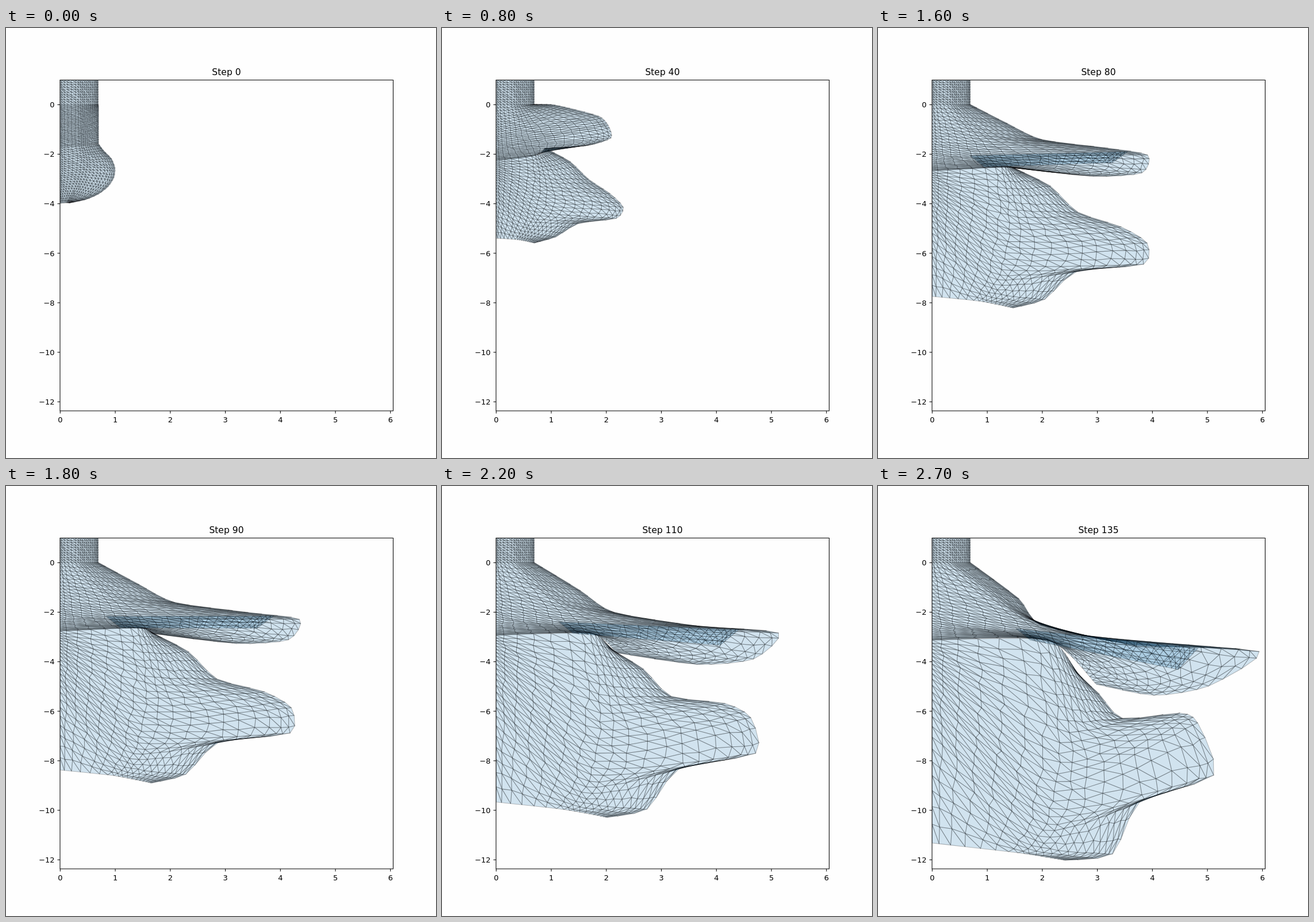
Write an HTML page with a canvas that moves like this. It is 748 px wide and 748 px high and loops after 2.8 s.

```html
<!DOCTYPE html>
<html lang="en">
<head>
<meta charset="utf-8">
<title>Mesh deformation</title>
<style>
  html, body { margin: 0; width: 100%; height: 100%; overflow: hidden; background: #fefefe; }
  canvas, svg { position: absolute; left: 0; top: 0; width: 748px; height: 748px; }
  text { font-family: "DejaVu Sans", sans-serif; font-size: 12.99px; }
  #title { font-size: 15.58px; }
  path { fill: none; stroke: #000; stroke-width: 1.04; }
</style>
</head>
<body>
<canvas id="mesh" width="748" height="748"></canvas>
<svg viewBox="0 0 748 748">
  <g id="axes"><path d="M94 90.5H673.5V666H94Z"/></g>
  <text id="title" x="383.5" y="82" text-anchor="middle">Step 0</text>
</svg>
<script>
const LEFT = 94, TOP = 90, LIP = 133, WALL = 160.5;
const INNER = 7, OUTER = 11, COLS = INNER + OUTER;
const FRAME_MS = 100, FRAMES = 28, STEPS = 5, LAST = (FRAMES - 1) * STEPS;
const ctx = document.getElementById('mesh').getContext('2d');
const title = document.getElementById('title');

// Slow start, then steady growth; 0..1 over the loop.
const travel = s => s * s / (s + 40);
const progress = s => travel(s) / travel(LAST);
const HALF = progress(80);

// Free surface of the jet and of the lower lobe, halfway and at the end.
const jetHalf = [[225,166], [285,194], [400,209], [469,221], [459,252], [375,258], [235,243]];
const jetEnd = [[245,196], [285,242], [450,277], [663,288], [575,348], [480,364], [380,345]];
const lobeHalf = [[238,244], [300,275], [347,320], [423,346], [468,374], [462,411], [345,424], [290,472], [235,487]];
const lobeEnd = [[345,325], [385,362], [425,404], [525,395], [556,412], [584,503], [455,550], [408,640], [325,651]];

const clamp = (x, lo, hi) => Math.max(lo, Math.min(hi, x));
const mix = (a, b, t) => a + (b - a) * t;
const mixPt = (a, b, t) => [mix(a[0], b[0], t), mix(a[1], b[1], t)];
const easeOut = (v, power) => 1 - Math.pow(1 - v, power);

// Parabolic motion through three positions.
function through(a, m, b, g) {
  const wa = (g - HALF) * (g - 1) / HALF;
  const wm = g * (g - 1) / (HALF * (HALF - 1));
  const wb = g * (g - HALF) / (1 - HALF);
  return [0, 1].map(c => wa * a[c] + wm * m[c] + wb * b[c]);
}

// Undeformed surface: straight neck, then an elliptic bulb.
const neck = v => [161, LIP + 68 * Math.pow(v, 1.5)];
function bulb(v) {
  const angle = mix(-55, 80, v) * Math.PI / 180;
  const x = LEFT + 96 * Math.cos(angle);
  return [angle < 0 ? Math.max(161, x) : x, 248 + 57 * Math.sin(angle)];
}

function jetRim(g) {
  const billow = 520 * Math.max(0, g * (HALF - g));
  const pts = jetHalf.map((m, i) => {
    const v = (i + 1) / jetHalf.length;
    const [x, y] = through(neck(v), m, jetEnd[i], g);
    return [x, Math.max(LIP, y - billow * (1 - v))];
  });
  return [[WALL, LIP], ...pts];
}

const lobeRim = g => lobeHalf.map((m, i) =>
  through(bulb(i / (lobeHalf.length - 1)), m, lobeEnd[i], g));

function hermite(a, b, ma, mb, t) {
  const t2 = t * t, t3 = t2 * t;
  return a * (2 * t3 - 3 * t2 + 1) + ma * (t3 - 2 * t2 + t) + b * (3 * t2 - 2 * t3) + mb * (t3 - t2);
}

// Cardinal spline through pts, v in 0..1.
function curve(pts) {
  const n = pts.length - 1, at = i => pts[clamp(i, 0, n)];
  return v => {
    const s = clamp(v, 0, 1) * n, i = Math.min(n - 1, Math.floor(s));
    const a = at(i), b = at(i + 1), p = at(i - 1), q = at(i + 2);
    return [0, 1].map(c => hermite(a[c], b[c], .35 * (b[c] - p[c]), .35 * (q[c] - a[c]), s - i));
  };
}

function noise(i, j) {
  const s = Math.sin(i * 12.9898 + j * 78.233) * 43758.5453;
  return s - Math.floor(s) - .5;
}

function triangle(a, b, c) {
  ctx.beginPath();
  ctx.moveTo(a[0], a[1]);
  ctx.lineTo(b[0], b[1]);
  ctx.lineTo(c[0], c[1]);
  ctx.closePath();
  ctx.fill();
  ctx.stroke();
}

// Triangulated sheet spanned by three guide curves.
function sheet(left, mid, right, rows) {
  const grid = [];
  for (let i = 0; i <= rows; i++) {
    const line = [];
    for (let j = 0; j <= COLS; j++) {
      const jitter = i > 0 && i < rows && j > 0 && j < COLS ? .25 : 0;
      const v = (i + jitter * noise(i, j)) / rows;
      const s = j + jitter * noise(j + 31, i);
      const u = s < INNER ? s / INNER / 2 : .5 + Math.pow((s - INNER) / OUTER, .85) / 2;
      line.push(curve([left(v), mid(v), right(v)])(u));
    }
    grid.push(line);
  }
  for (let i = 0; i < rows; i++) {
    for (let j = 0; j < COLS; j++) {
      const a = grid[i][j], b = grid[i][j + 1], c = grid[i + 1][j], d = grid[i + 1][j + 1];
      triangle(a, b, d);
      triangle(a, d, c);
    }
  }
}

function draw(step) {
  const g = progress(step), spread = step / (step + 20);
  const seam = 209 + 59 * Math.pow(g, .6), foot = 305 + 316 * g;
  const pinch = [131 + 164 * g, 205 + 63 * Math.pow(g, .8)];
  const toe = [105 + 138 * g, 304 + 334 * g];
  const jet = jetRim(g), lobe = lobeRim(g);

  ctx.clearRect(0, 0, 748, 748);
  ctx.save();
  ctx.beginPath();
  ctx.rect(LEFT, TOP, 580, 576);
  ctx.clip();
  ctx.fillStyle = 'rgba(31,119,180,.2)';
  ctx.strokeStyle = 'rgba(0,0,0,.25)';
  ctx.lineWidth = 1.04;
  ctx.lineJoin = 'round';

  // Fixed nozzle
  const side = x => v => [x, mix(TOP, LIP, v)];
  sheet(side(LEFT), side(130), side(WALL), 10);

  // Upper jet
  sheet(v => [LEFT, mix(LIP, seam, v + .85 * spread * v * (1 - v))],
    v => mixPt([130, LIP], pinch, easeOut(v, 1 + 2 * g)), curve(jet), 28);

  // Lower lobe
  sheet(v => [LEFT, mix(seam, foot, v - .75 * spread * (v - v * v * v))],
    v => {
      const [x, y] = mixPt(pinch, toe, easeOut(v, 1 + .6 * g));
      return [x + 4 * v * (1 - v) * (15 + 35 * g), y];
    }, curve(lobe), 24);

  // Folded layer inside the thin jet
  if (step > 60) {
    const a = [pinch[0] - 55, pinch[1] - 20], b = [pinch[0] - 30, pinch[1]];
    const c = mixPt(jet[3], jet[4], .5), d = mixPt(c, jet[6], .45);
    const near = v => mixPt(a, b, v), far = v => mixPt(c, d, v);
    sheet(near, v => mixPt(near(v), far(v), .5), far, 4);
  }
  ctx.restore();
  title.textContent = 'Step ' + step;
}

function addAxes() {
  let out = '';
  for (let n = 0; n <= 6; n++) {
    const x = 94.3 + 95.75 * n;
    out += `<path d="M${x} 666v4.5"/><text x="${x}" y="685.5" text-anchor="middle">${n}</text>`;
  }
  for (let n = 0; n <= 12; n += 2) {
    const y = 133.4 + 43.07 * n;
    out += `<path d="M94 ${y}h-4.5"/><text x="84.6" y="${y + 4.7}" text-anchor="end">${n ? '\u2212' + n : 0}</text>`;
  }
  document.getElementById('axes').insertAdjacentHTML('beforeend', out);
}

addAxes();
const start = performance.now();
let shown = -1;
function play(now) {
  const tick = Math.floor(Math.max(0, now - start) / FRAME_MS) % FRAMES;
  if (tick !== shown) {
    shown = tick;
    draw(tick * STEPS);
  }
  requestAnimationFrame(play);
}
play(start);
</script>
</body>
</html>
```
